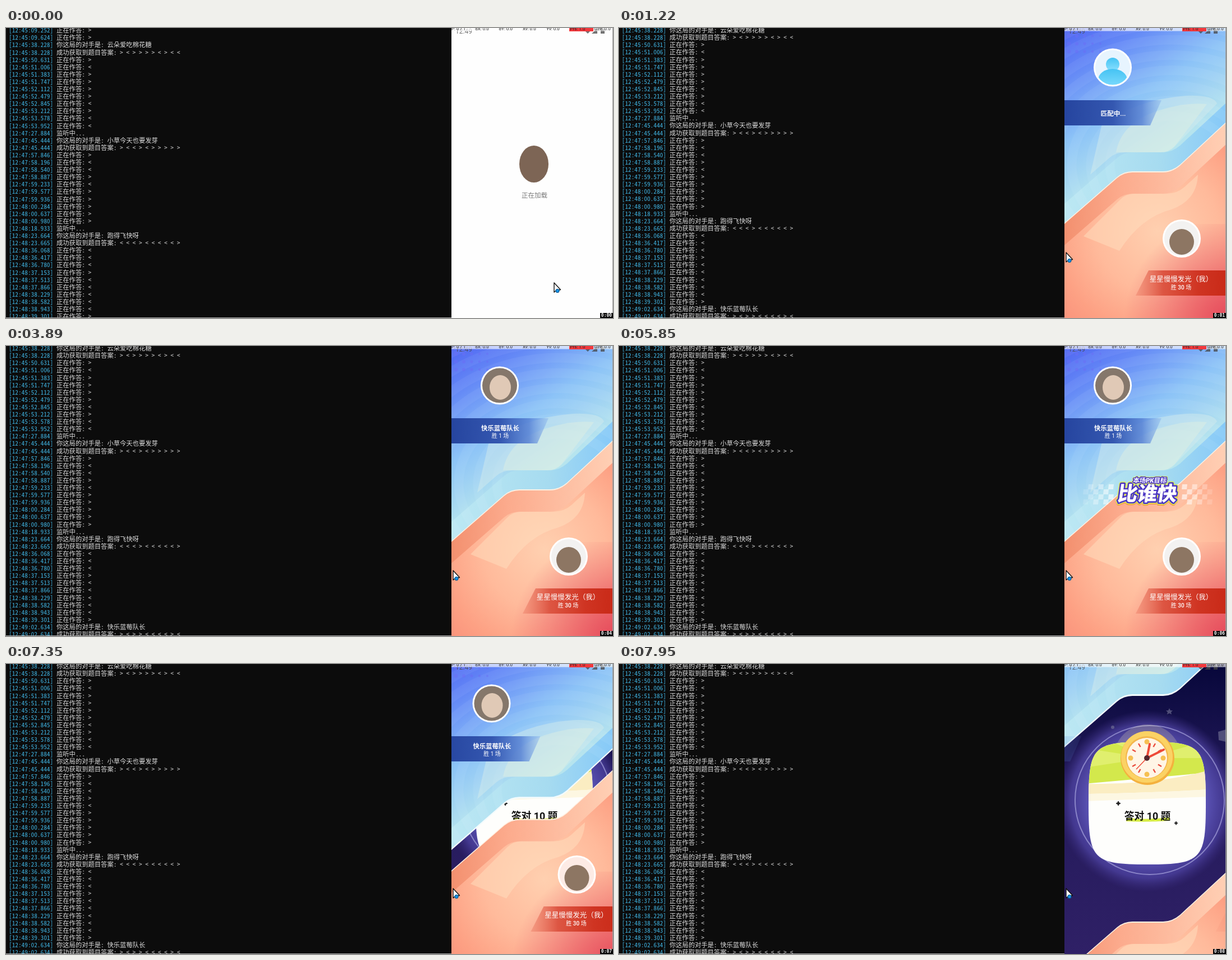
An HTML page for the animation above (8 s loop, 1082x518 px).

```html
<!DOCTYPE html>
<html lang="zh-CN">
<head>
<meta charset="utf-8">
<title>口算对战</title>
<style>
html, body { margin: 0; width: 100%; height: 100%; overflow: hidden; background: #0c0c0c; }
svg { display: block; width: 100vw; height: 100vh; }
text { font-family: Roboto, "Noto Sans CJK SC", "Noto Sans CJK", sans-serif; }
.mid text, text.mid { text-anchor: middle; }
#log { font-size: 11.3px; fill: #dedede; }
#log .mono { font-family: "Noto Sans Mono CJK SC", "Noto Sans Mono", monospace; }
#log .time { fill: #3fb2e0; }
#debug text { font-size: 8px; fill: #222; }
#timer { font: bold 8px "DejaVu Sans Mono", monospace; fill: #fff; }
.title { font-weight: 900; stroke-linejoin: round; }
</style>
</head>
<body>
<svg viewBox="0 0 1082 518" preserveAspectRatio="none">
<defs>
  <clipPath id="phoneClip"><path d="M794 0H1081.5V518H794Z"/></clipPath>
  <path id="top" d="M794-10H1082V170L1000 246Q986 258 970 258H915Q900 258 888 268L794 350Z"/>
  <path id="bottom" d="M1082 170L1000 246Q986 258 970 258H915Q900 258 888 268L794 350V530H1082Z"/>
  <path id="cardShape" d="M837 249C837 148 844 139 942 139C1039 139 1046 148 1046 249C1046 349 1039 358 942 358C844 358 837 349 837 249Z"/>
  <clipPath id="topClip"><use href="#top"/></clipPath>
  <clipPath id="cardClip"><use href="#cardShape"/></clipPath>
  <clipPath id="foeClip"><circle cx="880" cy="70.5" r="31"/></clipPath>
  <linearGradient id="topBand" gradientUnits="userSpaceOnUse" x1="794" x2="1082">
    <stop stop-color="#bce8f3"/><stop offset=".6" stop-color="#a6dbf0"/><stop offset="1" stop-color="#86c9f8"/>
  </linearGradient>
  <linearGradient id="topFill" gradientUnits="userSpaceOnUse" x1="794" y1="0" x2="960" y2="260">
    <stop stop-color="#4656f0"/><stop offset=".35" stop-color="#658af6"/><stop offset=".66" stop-color="#8cc3f7"/><stop offset="1" stop-color="#b6e4ee"/>
  </linearGradient>
  <linearGradient id="bottomBand" gradientUnits="userSpaceOnUse" x1="794" x2="1082">
    <stop stop-color="#f3906f"/><stop offset=".35" stop-color="#fcab8d"/><stop offset="1" stop-color="#ffcfb4"/>
  </linearGradient>
  <radialGradient id="bottomFill" gradientUnits="userSpaceOnUse" cx="960" cy="325" r="245">
    <stop stop-color="#ffd0b0"/><stop offset=".45" stop-color="#ffba9b"/><stop offset=".75" stop-color="#fda184"/><stop offset="1" stop-color="#f98f79"/>
  </radialGradient>
  <radialGradient id="redCorner" gradientUnits="userSpaceOnUse" cx="1090" cy="525" r="190">
    <stop stop-color="#e4465a"/><stop offset="1" stop-color="#e4465a" stop-opacity="0"/>
  </radialGradient>
  <linearGradient id="foeBar">
    <stop stop-color="#26459f"/><stop offset=".5" stop-color="#3457b0"/><stop offset=".8" stop-color="#5580d4" stop-opacity=".85"/><stop offset="1" stop-color="#7aa8ec" stop-opacity=".35"/>
  </linearGradient>
  <linearGradient id="myBar">
    <stop stop-color="#f08a72" stop-opacity=".6"/><stop offset=".3" stop-color="#dd5643"/><stop offset=".7" stop-color="#cf3422"/><stop offset="1" stop-color="#c92a18"/>
  </linearGradient>
  <linearGradient id="night" x2="0" y2="1">
    <stop stop-color="#07073a"/><stop offset=".4" stop-color="#231a5a"/><stop offset="1" stop-color="#2f2066"/>
  </linearGradient>
  <radialGradient id="glow">
    <stop offset=".6" stop-color="#6059bd"/><stop offset=".85" stop-color="#4a3f9c" stop-opacity=".8"/><stop offset="1" stop-color="#3a2d80" stop-opacity="0"/>
  </radialGradient>
  <linearGradient id="person" x2="0" y2="1"><stop stop-color="#45c3f3"/><stop offset="1" stop-color="#8be0ff"/></linearGradient>
</defs>

<path d="M0 0H794V518H0Z" fill="#0c0c0c"/>
<g id="log"></g>
<path d="M0 517H794V518H0Z" fill="#aaa"/>

<g clip-path="url(#phoneClip)">
  <g id="goal">
    <path d="M794 0H1082V518H794Z" fill="url(#night)"/>
    <circle cx="942" cy="245" r="162" fill="url(#glow)"/>
    <circle cx="946" cy="243" r="133" fill="none" stroke="#c2bff0" stroke-width="2" opacity=".55"/>
    <g fill="#777798" opacity=".6"><path d="M981 79l2 4 4 0-3 3 1 4-4-2-4 2 1-4-3-3 4 0Z"/><circle cx="880" cy="113" r="3"/><path d="M1068 121l14-4v22l-13-3Z"/></g>
    <circle cx="942" cy="168" r="60" fill="#f4eeb0" opacity=".22"/>
    <g clip-path="url(#cardClip)">
      <path d="M830 130H1050V360H830Z" fill="#fefefc"/>
      <path d="M830 130H1050V194L830 214Z" fill="#d3e84c"/>
      <path d="M942 168L830 150V185ZM942 168L1050 136V168ZM942 168L860 130H900Z" fill="#e6f27d" opacity=".7"/>
      <path d="M830 214Q960 216 1050 190V224Q960 230 830 232Z" fill="#fbedc2"/>
      <path d="M830 232Q960 230 1050 224V237L830 245Z" fill="#fdf7e2"/>
    </g>
    <circle cx="942" cy="168" r="48" fill="#f4b13e"/>
    <circle cx="941" cy="166" r="46" fill="#fbd264"/>
    <circle cx="941" cy="167" r="38" fill="#f3b64c"/>
    <circle cx="941" cy="168" r="36" fill="#fff5e6"/>
    <g id="dial"></g>
    <path d="M941 168L946 143M941 168L971 153" stroke="#ee4a38" stroke-width="4" stroke-linecap="round"/>
    <path d="M941 168L922 188" stroke="#ee4a38" stroke-width="1.5"/>
    <circle cx="941" cy="168" r="5" fill="#54262c"/>
    <path d="M904 275Q942 279 982 274V280Q942 283 904 281Z" fill="#d6ec45"/>
    <text class="mid" x="942" y="278" font-size="17.8" font-weight="700" fill="#111">答对 10 题</text>
    <path id="spark" d="M890 245l1.3 2.7 2.7 1.3-2.7 1.3-1.3 2.7-1.3-2.7-2.7-1.3 2.7-1.3Z" fill="#222" stroke="#222"/>
    <use href="#spark" transform="translate(281 85) scale(.8)"/>
  </g>

  <g id="topHalf">
    <use href="#top" y="3" fill="#f3fbfd"/>
    <use href="#top" fill="url(#topBand)"/>
    <g clip-path="url(#topClip)">
      <use href="#top" y="-36" fill="url(#topFill)"/>
      <g id="arcs" fill="none" stroke="#fff" stroke-opacity=".05" stroke-width="17"></g>
      <g id="dots" fill="#6a6ff5" opacity=".5"></g>
      <path d="M840 262L874 232Q886 222 902 222H966Q980 222 990 212L1066 135Q1060 119 1010 121Q920 128 860 175Z" fill="#d4ecea" opacity=".45"/>
      <path d="M886 222Q895 170 960 148Q1010 132 1048 136L990 212Q980 222 966 222Z" fill="#e4f1df" opacity=".4"/>
    </g>
  </g>
  <g id="bottomHalf">
    <use href="#bottom" y="-2" fill="#fff0e2"/>
    <use href="#bottom" fill="url(#bottomBand)"/>
    <use href="#bottom" y="38" fill="url(#bottomFill)"/>
    <path d="M828 372L894 306Q904 296 918 296H975Q995 296 1008 284L1032 262Q1030 308 985 324Q930 338 892 398Z" fill="#ffe0c0" opacity=".5"/>
    <path d="M794 350H1082V530H794Z" fill="url(#redCorner)"/>
  </g>

  <g id="foe" class="mid" fill="#fff">
    <circle id="ripple" cx="880" cy="70.5" r="46" opacity=".22"/>
    <circle cx="880" cy="70.5" r="34"/>
    <g id="unknown" clip-path="url(#foeClip)">
      <path d="M845 36H915V106H845Z" fill="#e7f4fe"/>
      <circle cx="880" cy="65" r="12" fill="url(#person)"/>
      <ellipse cx="880" cy="93" rx="26" ry="20" fill="url(#person)"/>
    </g>
    <g id="known">
      <circle cx="880" cy="70.5" r="31" fill="#85776b"/>
      <ellipse cx="881" cy="74" rx="19" ry="22" fill="#e0c9b6"/>
    </g>
    <path d="M794 129H967L947 174H794Z" fill="url(#foeBar)"/>
    <text id="matching" x="881" y="157" font-size="11.6" font-weight="700"></text>
    <g id="foeName">
      <text x="881" y="150.5" font-size="11.3" font-weight="700">快乐蓝莓队长</text>
      <text x="881" y="163.5" font-size="10">胜 1 场</text>
    </g>
  </g>
  <g id="me" class="mid" fill="#fff">
    <circle cx="1003" cy="376" r="34"/>
    <circle id="myDisc" cx="1003" cy="376" r="31"/>
    <ellipse cx="1003" cy="382" rx="22" ry="23" fill="#8d7663"/>
    <path d="M944 433H1082V478H921Z" fill="url(#myBar)"/>
    <text x="1002" y="452.5" font-size="12.5">星星慢慢发光（我）</text>
    <text x="1002" y="466.5" font-size="10" font-weight="500">胜 30 场</text>
  </g>

  <g id="versus">
    <g id="checks" fill="#fff"></g>
    <g class="mid title" transform="translate(942 263) skewX(-8)" fill="#fff">
      <g font-size="35">
        <text y="15" fill="#f39a3a" stroke="#f39a3a" stroke-width="8">比谁快</text>
        <text y="13" fill="#e0ee58" stroke="#e0ee58" stroke-width="9">比谁快</text>
        <text y="13" fill="#4b36c4" stroke="#4b36c4" stroke-width="6">比谁快</text>
        <text y="13" stroke="#fff" stroke-width=".8">比谁快</text>
      </g>
      <text x="1" y="-19.5" font-size="11.3" stroke="#e0ee58" stroke-width="5" paint-order="stroke">本场PK目标</text>
      <text x="1" y="-19.5" font-size="11.3" stroke="#4b36c4" stroke-width="3.2" paint-order="stroke">本场PK目标</text>
    </g>
  </g>

  <g id="loading">
    <path d="M794 0H1082V518H794Z" fill="#fefefe"/>
    <ellipse cx="941" cy="243" rx="26" ry="33" fill="#7d6555"/>
    <text class="mid" x="942" y="302.5" font-size="11.5" fill="#777">正在加载</text>
  </g>

  <g fill="#444" opacity=".75">
    <text x="801" y="10" font-size="12">12:49</text>
    <path d="M1032 5H1042L1037 10ZM1044 10L1054 1V10ZM1060 1H1067V10H1060Z"/>
  </g>
  <g id="debug">
    <path d="M794 0H1082V5.5H794Z" fill="#fff" opacity=".65"/>
    <path d="M1004 0H1047V6H1004Z" fill="#f2383c"/>
  </g>
</g>
<path d="M1081.5 0V518" stroke="#999"/>
<g id="cursor">
  <path d="M0 0V17L4 13.5L11.5 12.5Z" fill="#fff" stroke="#111" stroke-width="1.4" stroke-linejoin="round"/>
  <circle cx="6" cy="14.5" r="3.2" fill="#1590e0" stroke="#0b4f86"/>
</g>
<path d="M1059 509H1082V518H1059Z" fill="#000"/>
<text id="timer" class="mid" x="1070.5" y="516.3"></text>
</svg>

<script>
const LOOP = 8000;
const $ = id => document.getElementById(id);

function add(parent, tag, attrs, text) {
  const node = document.createElementNS('http://www.w3.org/2000/svg', tag);
  for (const key in attrs) node.setAttribute(key, attrs[key]);
  if (text) node.textContent = text;
  return parent.appendChild(node);
}

// One entry per log line: ">" or "<" answer, "." listening, "@" opponent, "=" all answers.
const entries = `45:09.252 >|45:09.624 >|45:38.228 @云朵爱吃棉花糖|45:38.228 =><>>>><><<
45:50.631 >|45:51.006 <|45:51.383 >|45:51.747 >|45:52.112 >|45:52.479 >|45:52.845 <|45:53.212 >|45:53.578 <|45:53.952 <
47:27.884 .|47:45.444 @小草今天也要发芽|47:45.444 =><<><>>>>>
47:57.846 >|47:58.196 <|47:58.540 <|47:58.887 >|47:59.233 <|47:59.577 >|47:59.936 >|48:00.284 >|48:00.637 >|48:00.980 >
48:18.933 .|48:23.664 @跑得飞快呀|48:23.665 =<<<><<<<<>
48:36.068 <|48:36.417 <|48:36.780 <|48:37.153 >|48:37.513 <|48:37.866 <|48:38.229 <|48:38.582 <|48:38.943 <|48:39.301 >
49:02.634 @快乐蓝莓队长|49:02.634 =><>><<<<><`.split(/[\n|]/);

const CELL = 5.65, ROW = 13.1;

// Font size at which one monospace character fills one terminal cell.
function cellFontSize() {
  const ctx = document.createElement('canvas').getContext('2d');
  ctx.font = '100px "Noto Sans Mono CJK SC", "Noto Sans Mono", monospace';
  return CELL * 100 / ctx.measureText('0').width;
}
const monoSize = cellFontSize();

entries.forEach((entry, i) => {
  const [time, body] = entry.split(' ');
  const rest = body.slice(1);
  const [label, mono, name] = {
    '.': ['监听中', '...'],
    '@': ['你这局的对手是', ':', rest],
    '=': ['成功获取到题目答案', ': ' + [...rest].join(' ')]
  }[body[0]] || ['正在作答', ': ' + body];
  const line = add($('log'), 'text', { y: 8.2 + i * ROW });
  const monoX = 90 + label.length * 2 * CELL;
  add(line, 'tspan', { x: 5, class: 'mono time', 'font-size': monoSize }, `[12:${time}]`);
  add(line, 'tspan', { x: 90 }, label);
  add(line, 'tspan', { x: monoX, class: 'mono', 'font-size': monoSize }, mono);
  if (name) add(line, 'tspan', { x: monoX + 2 * CELL }, name);
});

['P: 0 / 1', 'dX: 0.0', 'dY: 0.0', 'Xv: 0.0', 'Yv: 0.0', 'Prs: 1.0', 'Size: 0.0']
  .forEach((label, i) => add($('debug'), 'text', { x: 794 + i * 42.3, y: 3.6 }, label));

for (let i = 0; i < 12; i++) {
  const turn = `rotate(${i * 30} 941 168)`;
  if (i % 3) add($('dial'), 'path', { d: 'M941 138V145', stroke: '#ea4a3c', 'stroke-width': 2.4, transform: turn });
  else add($('dial'), 'circle', { cx: 941, cy: 139, r: 4.5, fill: '#f6c052', transform: turn });
}

for (let r = 110; r < 350; r += 34) add($('arcs'), 'ellipse', { cx: 985, cy: 245, rx: r, ry: r * 0.8 });

for (let i = 0; i < 15; i++)
  add($('dots'), 'circle', { cx: 802 + (i % 5) * 14, cy: 14 + Math.floor(i / 5) * 14, r: 3.5 - (i % 5) * 0.4 });

for (let col = 0; col < 6; col++)
  for (let row = col % 2; row < 4; row += 2)
    for (const x of [872 - col * 9, 1003 + col * 9])
      add($('checks'), 'path', { d: `M${x + 1} ${247 + row * 9}h9l-1 9h-9Z`, opacity: 0.6 - col * 0.09 });

const show = (id, on) => { $(id).style.display = on ? '' : 'none'; };
const move = (id, x, y) => $(id).setAttribute('transform', `translate(${x} ${y})`);
const within = (t, spans) => spans.some(([a, b]) => t >= a && t < b);
const stepOf = (t, start, length) => Math.floor((t - start) / length);
const passed = (t, times) => times.filter(at => t >= at).length;

const SECONDS = [950, 1870, 2970, 3890, 4860, 5850, 6760, 7950];
const DOT_TIMES = [750, 1220, 1760, 2230, 2680];
const RIPPLES = [[480, 750], [1490, 2050], [2880, 3240]];
const POP = [0.45, 0.8, 1.06, 1];

function versusScale(t) {
  if (t < 4170 || t >= 7260) return 0;
  if (t >= 7170) return 0.6;
  return POP[Math.min(3, stepOf(t, 4170, 90))];
}

function gapAt(t) {
  if (t < 7170) return 0;
  const held = t >= 7950 ? 780 : stepOf(t, 7170, 90) * 90;
  return 204 * (held / 780) ** 1.56;
}

function draw(t) {
  move('log', 0, t < 180 ? 0 : -2 * ROW);
  const glide = Math.max(0, Math.min(1, (stepOf(t, 180, 75) + 1) / 5));
  move('cursor', 977 - 180 * glide, 455 - 54 * glide);
  $('timer').textContent = '0:0' + passed(t, SECONDS);

  const found = t >= 3240;
  show('loading', t < 255);
  show('unknown', !found);
  show('known', found);
  show('matching', !found);
  show('foeName', found);
  show('ripple', within(t, RIPPLES));
  $('matching').textContent = '匹配中' + '.'.repeat(passed(t, DOT_TIMES) % 3 + 1);
  $('myDisc').setAttribute('fill', t < 6220 ? '#f3f2f1' : '#fdebe5');

  const scale = versusScale(t);
  show('versus', scale);
  $('versus').setAttribute('transform', `translate(942 264) scale(${scale}) translate(-942 -264)`);

  const gap = gapAt(t);
  show('goal', gap);
  move('topHalf', 0, -gap);
  move('bottomHalf', 0, gap);
  move('foe', -gap * 0.7, 0);
  move('me', gap * 0.7, 0);
  const fade = 1 - Math.max(0, gap - 90) / 150;
  $('foe').setAttribute('opacity', fade);
  $('me').setAttribute('opacity', fade);
}

const start = performance.now();
function tick() {
  draw((performance.now() - start) % LOOP);
  requestAnimationFrame(tick);
}
tick();
</script>
</body>
</html>
```
